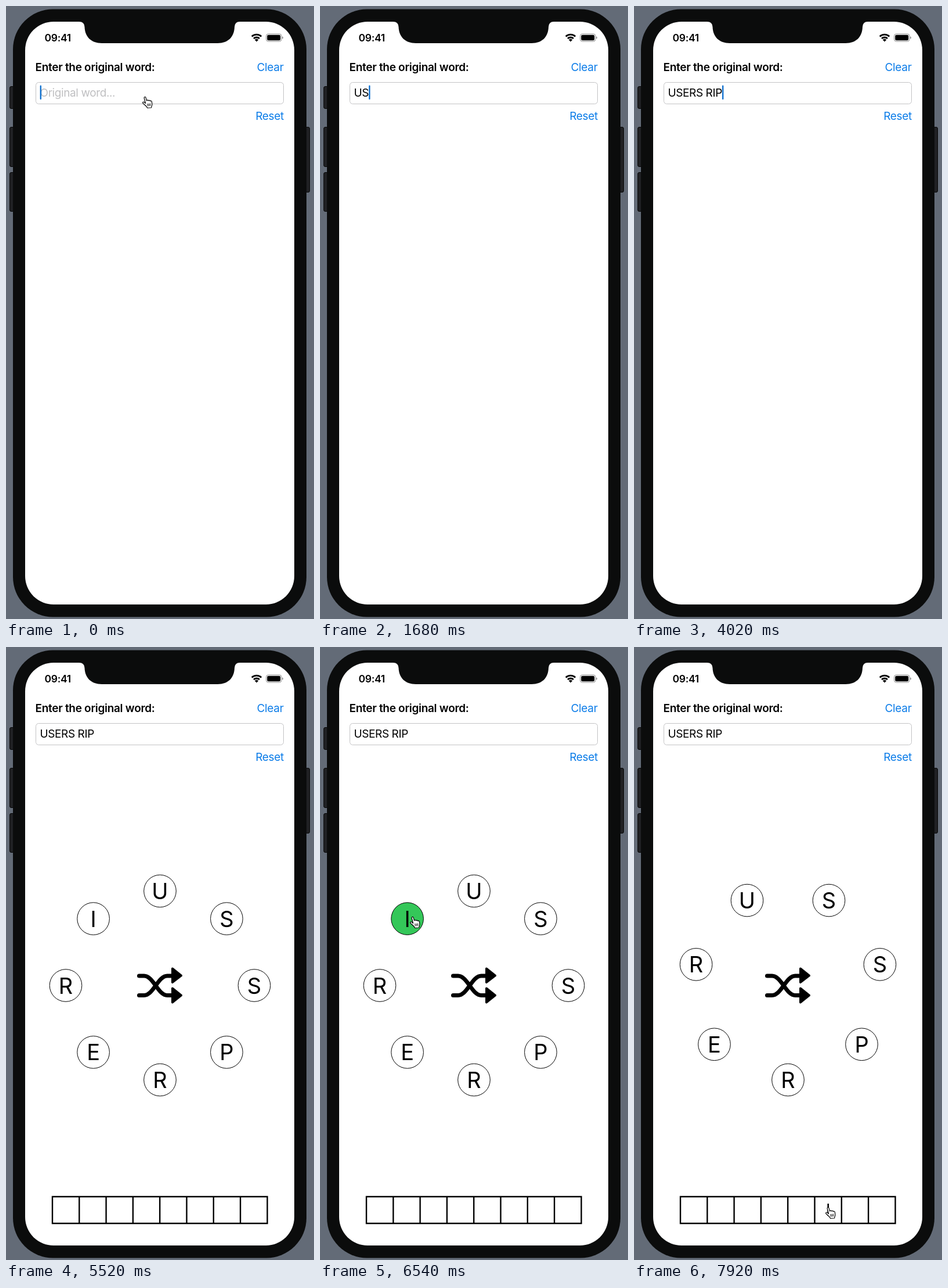
Recreate the animation shown at these times as an HTML page. Size 531x1055 px, loop 8000 ms.

```html
<!DOCTYPE html>
<html lang="en">
<head>
<meta charset="utf-8">
<title>Anagram helper</title>
<style>
  html, body { margin: 0; width: 100%; height: 100%; overflow: hidden; background: #636b77; }
  svg { display: block; width: 531px; height: 1055px; }
  text { font: 400 19px Inter, "Liberation Sans", sans-serif; letter-spacing: -.4px; white-space: pre; }
  .bold { font-weight: 600; letter-spacing: -.3px; }
  .clock { font-size: 17.5px; }
  .link { fill: #0b7ce8; text-anchor: end; letter-spacing: -.3px; }
  .hint { fill: #bfbfc1; }
  .tile circle { fill: #fff; stroke: #000; }
  .tile text { font-size: 38px; text-anchor: middle; letter-spacing: 0; }
  .slots { fill: none; stroke: #000; stroke-width: 2.4; }
  #placed { font-size: 28px; text-anchor: middle; letter-spacing: 0; }
  .key { fill: #202124; stroke: #050505; }
  .line { fill: none; stroke: #000; }
</style>
</head>
<body>
<svg viewBox="0 0 531 1055">
  <g class="key">
    <rect x="6.5" y="138.5" width="12" height="38" rx="2.5"/>
    <rect x="6.5" y="208.5" width="12" height="68" rx="2.5"/>
    <rect x="6.5" y="286.5" width="12" height="67" rx="2.5"/>
    <rect x="511.5" y="208.5" width="12" height="112" rx="2.5"/>
  </g>
  <rect x="12" y="5.5" width="506" height="1046" rx="69" fill="#0b0c0c"/>
  <rect x="33" y="27" width="464" height="1003" rx="49" fill="#fff"/>
  <path d="M126 26V27Q135 27 135.5 36C136 53 147 64 165 64H365C383 64 393.500 53 394 36Q394.500 27 403 27V26Z" fill="#0b0c0c"/>

  <text class="bold clock" x="66.500" y="61">09:41</text>
  <g class="line" stroke-width="2.800">
    <path d="M423.800 52.500A11.700 11.700 0 0 1 440.200 52.500"/>
    <path d="M427 56A7.200 7.200 0 0 1 437 56"/>
  </g>
  <path d="M432 61.500L428.900 58.200A4.500 4.500 0 0 1 435.100 58.200Z"/>
  <rect x="448.500" y="48" width="26.500" height="13" rx="3.800" fill="none" stroke="#8e8e8e"/>
  <rect x="450.200" y="49.700" width="23" height="9.600" rx="2.300"/>
  <path d="M476.200 52.300Q478 53 478 54.500T476.200 56.700Z" fill="#8e8e8e"/>

  <text class="bold" x="50.500" y="112">Enter the original word:</text>
  <text class="link" x="478.500" y="112">Clear</text>
  <rect x="51.500" y="131.500" width="427" height="37" rx="5" fill="#fff" stroke="#c3c3c5"/>
  <text class="hint" id="hint" x="58.500" y="156">Original word...</text>
  <text id="typed" x="58.500" y="156"></text>
  <rect id="caret" y="136.500" width="2.400" height="24.500" rx="1.200" fill="#1272cf"/>
  <text class="link" x="479" y="196">Reset</text>

  <g id="board">
    <g id="wheel"></g>
    <g class="line" stroke-width="7" stroke-linecap="round">
      <path d="M229.500 566H238C254 566 262 599.500 278 599.500H287"/>
      <path d="M229.500 599.500H238C254 599.500 262 566 278 566H287"/>
    </g>
    <g stroke="#000" stroke-width="4" stroke-linejoin="round">
      <path id="head" d="M287 553.500L302 565.500L287 577Z"/>
      <path d="M287 587.500L302 599.500L287 611.500Z"/>
    </g>
    <path class="slots" id="slots"/>
    <text id="placed" x="334.700" y="979">I</text>
  </g>

  <g id="hand">
    <path d="M5.500 12.500L3.200 3.500C2.700 1.300 5.400 .7 6 2.700L7.600 8C7.900 6.400 10.300 6.400 10.700 8C11 6.900 13.200 7 13.600 8.700C14.200 7.700 16.200 8.200 16.400 10L16.800 14C16.900 16.500 15.800 17.500 15.500 20L8.500 20.500C8 18 4.500 15.500 1.200 12.500C-.2 11 1.500 9.300 3.200 10.400Z" fill="#fff" stroke="#000" stroke-width="1.200" stroke-linejoin="round"/>
    <path class="line" d="M8.800 13L9.400 17.500M11.200 12.800L11.600 17.300M13.600 12.600L13.800 17" stroke-width="1"/>
  </g>
</svg>
<script>
  const LOOP = 8000, STEP = 60;
  const WORD = "USERS RIP";
  const KEY_TIMES = [1380, 1680, 1920, 2280, 2640, 3120, 3420, 3660, 4020];
  const RING = "USSPRERI";
  const CENTER = [265.5, 582.5], RADIUS = 162.5;
  const GREEN = [52, 199, 89];

  const $ = id => document.getElementById(id);
  const mix = (a, b, p) => a + (b - a) * p;
  const span = (t, from, to) => Math.min(1, Math.max(0, (t - from) / (to - from)));
  const easeIn = p => p * p;
  const easeOut = p => 1 - (1 - p) ** 2;
  const easeInOut = p => p * p * (3 - 2 * p);

  function svgNode(name, parent, attrs = {}) {
    const node = document.createElementNS("http://www.w3.org/2000/svg", name);
    for (const key in attrs) node.setAttribute(key, attrs[key]);
    return parent.appendChild(node);
  }

  const tiles = [...RING].map(letter => {
    const g = svgNode("g", $("wheel"), { class: "tile" });
    svgNode("circle", g, { r: 27.8 });
    svgNode("text", g, { y: 14 }).textContent = letter;
    return g;
  });
  const picked = tiles[7];

  let grid = "M80 946H450.500V992H80Z";
  for (let i = 1; i < 8; i++) grid += `M${80 + i * 46.3} 946V992`;
  $("slots").setAttribute("d", grid);

  function ringPoint(degrees) {
    const a = degrees * Math.PI / 180;
    return [CENTER[0] + RADIUS * Math.cos(a), CENTER[1] + RADIUS * Math.sin(a)];
  }

  const along = (a, b, p) => [mix(a[0], b[0], p), mix(a[1], b[1], p)];
  const curve = (a, b, c, p) => along(along(a, b, p), along(b, c, p), p);

  function handAt(t) {
    const field = [235, 155], letter = [155, 463], slot = [330, 963];
    if (t < 480) return along(field, [589, 90], easeIn(span(t, 0, 480)));
    if (t < 5700) return null;
    if (t < 6720) return along([576, 225], letter, easeOut(span(t, 5640, 6120)));
    return curve(letter, [340, 700], slot, easeInOut(span(t, 6720, 7380)));
  }

  function drawField(t) {
    const count = KEY_TIMES.filter(k => t >= k).length;
    $("typed").textContent = WORD.slice(0, count);
    $("hint").style.opacity = count ? 0 : 1;
    const blink = 1 - span(t, 510, 720) + span(t, 840, 1020);
    $("caret").style.opacity = t < 4440 ? blink : 0;
    const width = count ? $("typed").getComputedTextLength() : 0;
    $("caret").setAttribute("x", 58.6 + width);
  }

  function drawBoard(t) {
    $("board").style.opacity = easeInOut(span(t, 4390, 4690));
    const regroup = easeInOut(span(t, 7570, 7920));
    tiles.forEach((tile, i) => {
      const eight = ringPoint(-90 + 45 * i);
      const seven = ringPoint(-90 + 360 / 7 * (i - .5));
      const at = tile === picked ? eight : along(eight, seven, regroup);
      tile.setAttribute("transform", `translate(${at})`);
    });
    const tint = easeInOut(span(t, 6300, 6540));
    picked.firstChild.style.fill = `rgb(${GREEN.map(c => mix(255, c, tint))})`;
    picked.style.opacity = 1 - regroup;
    $("placed").style.opacity = regroup;
  }

  function drawHand(t) {
    const at = handAt(t);
    $("hand").style.display = at ? "" : "none";
    if (at) $("hand").setAttribute("transform", `translate(${at})`);
  }

  function render(now) {
    const t = Math.floor(now % LOOP / STEP) * STEP;
    drawField(t);
    drawBoard(t);
    drawHand(t);
  }

  const start = performance.now();
  function tick() {
    render(performance.now() - start);
    requestAnimationFrame(tick);
  }
  tick();
</script>
</body>
</html>
```
